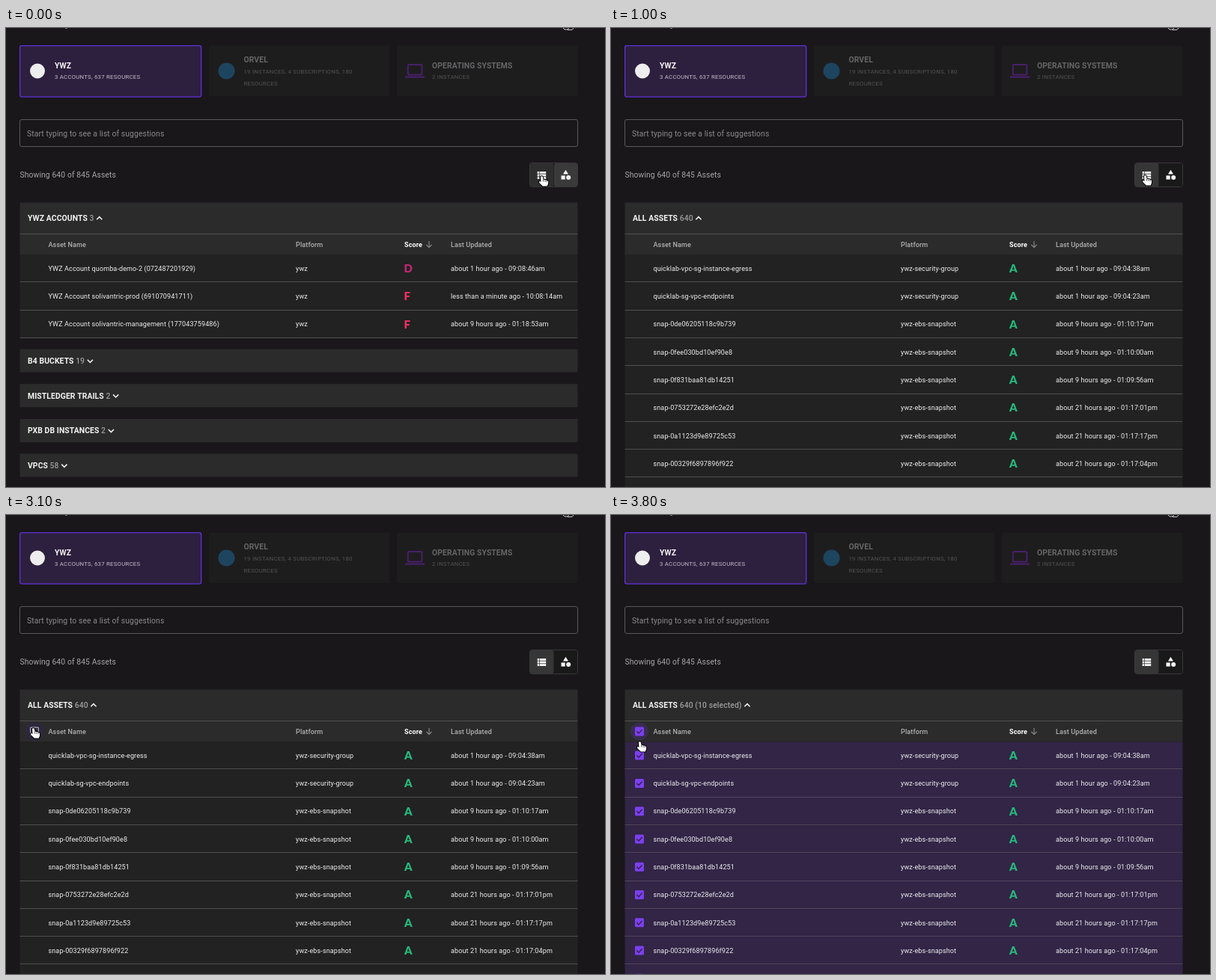
These frames come from a looping animation (800 px wide and 614 px high, 3900 ms). An HTML page with a canvas:

```html
<!DOCTYPE html>
<html lang="en">
<head>
<meta charset="utf-8">
<title>Asset list</title>
<style>
  html, body { margin: 0; width: 800px; height: 614px; overflow: hidden; background: #19171a; }
  canvas { display: block; }
</style>
</head>
<body>
<canvas id="stage" width="800" height="614"></canvas>
<script>
const ctx = document.getElementById('stage').getContext('2d');
const LOOP = 3900, STEP = 100;
const LEFT = 18.5, WIDTH = 745, ROW = 37.28;
const BODY = 10.36, CELL = 9.06, CAPTION = 7.77;

const accounts = [
  ['YWZ Account quomba-demo-2 (072487201929)', 'ywz', 'D', 'about 1 hour ago - 09:08:46am'],
  ['YWZ Account solivantric-prod (691070941711)', 'ywz', 'F', 'less than a minute ago - 10:08:14am'],
  ['YWZ Account solivantric-management (177043759486)', 'ywz', 'F', 'about 9 hours ago - 01:18:53am']
];
const group = (name, ago) => [name, 'ywz-security-group', 'A', 'about 1 hour ago - ' + ago];
const snap = (id, ago) => ['snap-' + id, 'ywz-ebs-snapshot', 'A', 'about ' + ago];
const assets = [
  group('quicklab-vpc-sg-instance-egress', '09:04:38am'),
  group('quicklab-sg-vpc-endpoints', '09:04:23am'),
  snap('0de06205118c9b739', '9 hours ago - 01:10:17am'),
  snap('0fee030bd10ef90e8', '9 hours ago - 01:10:00am'),
  snap('0f831baa81db14251', '9 hours ago - 01:09:56am'),
  snap('0753272e28efc2e2d', '21 hours ago - 01:17:01pm'),
  snap('0a1123d9e89725c53', '21 hours ago - 01:17:17pm'),
  snap('00329f6897896f922', '21 hours ago - 01:17:04pm'),
  snap('04b81c6de2f0397a5', '21 hours ago - 01:17:09pm')
];
const collapsed = [['B4 BUCKETS', 19], ['MISTLEDGER TRAILS', 2], ['PXB DB INSTANCES', 2], ['VPCS', 58]];
const scoreColor = { A: '#27b87b', D: '#bd2672', F: '#ef2e63' };

// Pointer path: time, x, y of the hot spot
const route = [
  [0, 716, 198], [600, 714, 197], [1800, 714, 197], [2000, 640, 225], [2200, 380, 290],
  [2400, 175, 306], [2500, 139.5, 299], [2800, 40, 287], [3000, 37, 285], [3600, 37, 285],
  [3700, 37, 289], [3800, 39, 303]
];

const handShape = new Path2D('M-1.5 8L-2 1.6Q-2 .2-.6 .2Q.7 .2 1 1.6L1.6 5Q3 4.2 4 5.4Q5.4 4.8 6.3 6.2Q8 6 8.2 7.6L8 10.4L6.8 13.6H.8L-3.6 9.2Q-4.6 7.6-3.4 7Q-2.4 6.8-1.5 8Z');
const handLines = new Path2D('M1.6 5V7.6M4 5.6V7.8M6.2 6.4V8.2');
const arrowShape = new Path2D('M0 0V12.5L3 9.8L5 14.5L7 13.6L5.1 9.2H9Z');

function pointer(t) {
  const next = route.findIndex(p => p[0] > t);
  if (next < 0) return route[route.length - 1].slice(1);
  const a = route[next - 1], b = route[next], k = (t - a[0]) / (b[0] - a[0]);
  return [a[1] + (b[1] - a[1]) * k, a[2] + (b[2] - a[2]) * k];
}

function rect(x, y, w, h, fill, radius = 0) {
  ctx.fillStyle = fill;
  ctx.beginPath();
  ctx.roundRect(x, y, w, h, radius);
  ctx.fill();
}

function frame(x, y, w, h, color, radius = 0, line = 1) {
  ctx.strokeStyle = color;
  ctx.lineWidth = line;
  ctx.beginPath();
  ctx.roundRect(x, y, w, h, radius);
  ctx.stroke();
}

function disc(x, y, r, fill) {
  ctx.fillStyle = fill;
  ctx.beginPath();
  ctx.arc(x, y, r, 0, Math.PI * 2);
  ctx.fill();
}

function polyline(points, color, width) {
  ctx.strokeStyle = color;
  ctx.lineWidth = width;
  ctx.beginPath();
  points.forEach(([x, y]) => ctx.lineTo(x, y));
  ctx.stroke();
}

// Writes text centred on cap height and returns its right edge
function label(str, x, middle, size, color, weight = 400, spacing = 0.0094) {
  ctx.font = `${weight} ${size}px Roboto, sans-serif`;
  ctx.letterSpacing = size * spacing + 'px';
  ctx.fillStyle = color;
  ctx.fillText(str, x, middle + size * 0.355);
  return x + ctx.measureText(str).width;
}

function chevron(x, y, up) {
  const d = up ? -1.8 : 1.8;
  polyline([[x - 3.6, y - d], [x, y + d], [x + 3.6, y - d]], '#f0f0f0', 1.6);
}

function heading(title, count, y, open) {
  const end = label(title, LEFT + 10.5, y, BODY, '#f4f4f4', 700);
  chevron(label(String(count), end + 2.6, y, BODY, '#9c9c9c', 500) + 7.3, y + 0.3, open);
}

function caption(str, x, y, color) {
  label(str, x, y, CAPTION, color, 400, 0.033);
}

function paintTop() {
  polyline([[79, 0.5], [82, 0.5]], '#77757a', 1);
  polyline([[744, 0], [746, 2], [750, 2], [752, 0]], '#c8c8c8', 1);
  polyline([[750, 2.5], [756, 2.5], [758, 0]], '#c8c8c8', 1);

  rect(18, 23, 243.3, 69.6, '#2d1f3e', 3);
  frame(18.65, 23.65, 242, 68.4, '#6030d8', 2.5, 1.3);
  disc(42, 57.5, 10, '#eeeeee');
  label('YWZ', 65, 50, BODY, '#f6f6f6', 700);
  caption('3 ACCOUNTS, 637 RESOURCES', 65, 65.5, '#c6c0cd');

  rect(271, 23.5, 241.5, 67.5, '#1e1d1e', 3);
  disc(294.5, 57.5, 11, '#1d455f');
  label('ORVEL', 317.5, 42.3, BODY, '#666567', 700);
  caption('19 INSTANCES, 4 SUBSCRIPTIONS, 180', 317.5, 57.8, '#535254');
  caption('RESOURCES', 317.5, 74.2, '#535254');

  rect(522, 23.5, 241.5, 67.5, '#1e1d1e', 3);
  frame(536.8, 49, 18.6, 13.4, '#47206a', 1.5, 2);
  rect(533, 64.5, 26, 2.2, '#47206a');
  label('OPERATING SYSTEMS', 569, 50, BODY, '#666567', 700);
  caption('2 INSTANCES', 569, 65.5, '#535254');

  frame(LEFT, 122.5, WIDTH, 36, '#585759', 2.5);
  label('Start typing to see a list of suggestions', 28, 141.3, BODY, '#8b8a8c');
  label('Showing 640 of 845 Assets', 18.5, 196.8, BODY, '#a6a5a7');
}

function paintToggle(t) {
  const fade = Math.min(1, Math.max(0, (t - 700) / 300));
  const gray = v => `rgb(${v},${v},${v})`;
  const list = t < 700 ? 46 : 92 - 38 * fade;
  const kinds = t < 700 ? 58 : 49 - 24 * fade;
  frame(699.5, 180.5, 64, 32, '#39383a', 3);
  rect(700, 181, 31.5, 31, gray(list), 2.5);
  rect(732, 181, 31, 31, gray(kinds), 2.5);
  for (let i = 0; i < 3; i++) {
    rect(709.7, 192 + i * 3.6, 2.6, 2.8, '#f6f6f6');
    rect(713, 192 + i * 3.6, 8.2, 2.8, '#f6f6f6');
  }
  ctx.fillStyle = '#f6f6f6';
  ctx.fill(new Path2D('M747.5 189.8L751 195.6H744Z'));
  rect(741.5, 197.4, 5.2, 5.2, '#f6f6f6');
  disc(751.2, 199.9, 3, '#f6f6f6');
}

function checkbox(y, color, checked) {
  if (!checked) return frame(32.6, y - 5.4, 10.8, 10.8, color, 1, 1.2);
  rect(32, y - 6, 12, 12, '#7c3ff0', 1.5);
  polyline([[34.5, y], [37, y + 2.6], [41.6, y - 2.4]], '#2f2146', 1.4);
}

function paintTable(rows, title, count, state) {
  const { selected, loading, hoverRow, headBox, halo } = state;
  const shift = loading ? 65.3 : 0;
  rect(LEFT, 233.5, WIDTH, 42, '#2b2b2b');
  rect(LEFT, 275.5, WIDTH, 28, '#2b2b2b');
  rect(LEFT, 275, WIDTH, 1, '#505050');
  heading(title, count, 254.2, true);

  if (halo) disc(38, 289.5, 12, selected ? '#392c50' : '#2e2740');
  if (headBox) checkbox(289.5, headBox, selected);
  label('Asset Name', 56.5, 289.6, CELL, '#b2b2b2', 500, 0.0107);
  label('Platform', 387, 289.6, CELL, '#b2b2b2', 500, 0.0107);
  label('Score', 532, 289.6, CELL, '#ffffff', 700, 0.0107);
  label('Last Updated', 594, 289.6, CELL, '#b2b2b2', 500, 0.0107);
  polyline([[565, 285], [565, 293.4]], '#8d8d8d', 1.1);
  polyline([[561.3, 289.8], [565, 293.5], [568.7, 289.8]], '#8d8d8d', 1.1);

  if (loading) {
    rect(LEFT, 303.5, WIDTH, shift, '#222222');
    rect(LEFT, 368, WIDTH, 1, '#505050');
    label('Loading All Assets...', 362.5, 335.3, CELL, '#eeeeee', 400, 0.0107);
  }
  rows.forEach(([name, platform, score, updated], i) => {
    const y = 321.62 + shift + i * ROW;
    rect(LEFT, 303.5 + shift + i * ROW, WIDTH, ROW, selected ? '#322546' : '#222222');
    if (selected || i === hoverRow) checkbox(y, '#c9c9c9', selected);
    label(name, 56.5, y, CELL, '#eeeeee', 400, 0.0107);
    label(platform, 387, y, CELL, '#eeeeee', 400, 0.0107);
    label(updated, 594, y, CELL, '#eeeeee', 400, 0.0107);
    ctx.font = '900 15px Lato, sans-serif';
    ctx.letterSpacing = '0px';
    ctx.fillStyle = scoreColor[score];
    ctx.fillText(score, score === 'A' ? 532 : 531.5, y + 5.4);
  });
  rows.forEach((_, i) => {
    rect(LEFT, Math.round(339.4 + shift + i * ROW), WIDTH, 1, selected ? '#51465f' : '#505050');
  });
}

function paintPointer(x, y) {
  const onToggle = x > 699 && y > 180 && y < 213;
  const onBox = x < 50 && y > 276;
  const hand = onToggle || onBox;
  const shape = hand ? handShape : arrowShape;
  ctx.save();
  ctx.translate(x, y);
  ctx.lineJoin = 'round';
  ctx.fillStyle = hand ? '#ffffff' : '#000000';
  ctx.strokeStyle = hand ? '#000000' : '#ffffff';
  ctx.lineWidth = 2;
  ctx.stroke(shape);
  ctx.fill(shape);
  ctx.lineWidth = 0.7;
  if (hand) ctx.stroke(handLines);
  ctx.restore();
}

function paintList(t) {
  if (t < 700) {
    paintTable(accounts, 'YWZ ACCOUNTS', 3, {});
    collapsed.forEach(([title, count], i) => {
      const y = 445.2 + i * 46.65;
      rect(LEFT, y - 15.6, WIDTH, 31, '#2b2b2b');
      heading(title, count, y, false);
    });
    return;
  }
  const [x, y] = pointer(t), [, before] = pointer(t - STEP);
  const onHeader = v => v > 276 && v < 303;
  const selected = t >= 3700;
  const halo = selected || (onHeader(y) && x < 50);
  let headBox = null;
  if (halo) headBox = '#b0b0b0';
  else if (onHeader(y)) headBox = onHeader(before) ? '#8a8a8a' : '#3a3a3a';
  ctx.globalAlpha = Math.min(1, 0.18 + (t - 700) / 300 * 0.82);
  paintTable(assets, 'ALL ASSETS', selected ? '640 (10 selected)' : 640, {
    selected, halo, headBox,
    loading: t < 900,
    hoverRow: before > 303 ? Math.floor((before - 303) / ROW) : -1
  });
  ctx.globalAlpha = 1;
}

function render(now) {
  const t = Math.floor(now % LOOP / STEP) * STEP;
  rect(0, 0, 800, 614, '#19171a');
  paintTop();
  paintToggle(t);
  paintList(t);
  paintPointer(...pointer(t));
}

const start = performance.now();
function tick() {
  render(performance.now() - start);
  requestAnimationFrame(tick);
}
tick();
</script>
</body>
</html>
```
